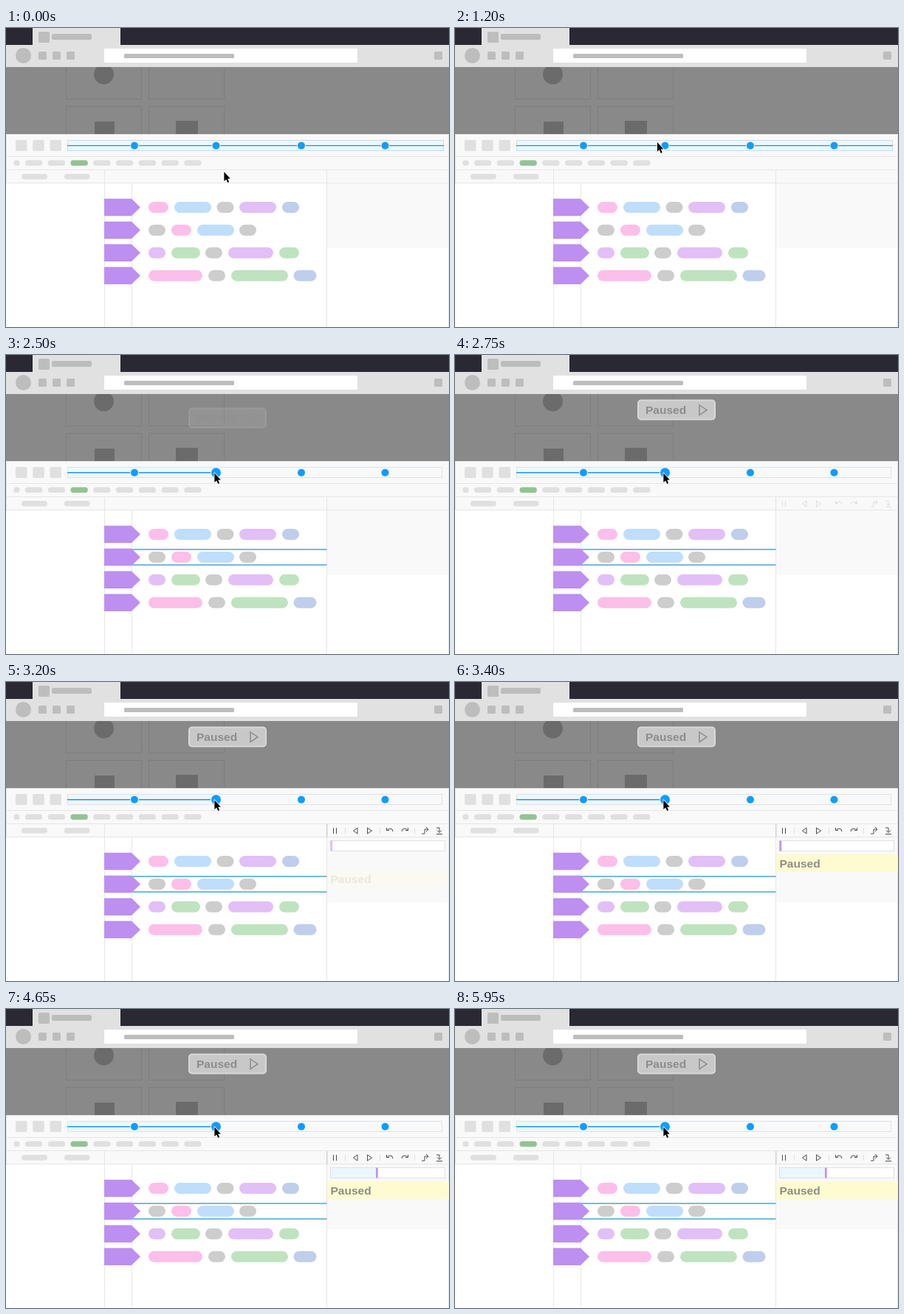
Animation, 600 px wide and 406 px high, one loop 6000 ms. Source, as an HTML page with a canvas:

```html
<!DOCTYPE html>
<html lang="en">
<head>
<meta charset="utf-8">
<title>Animation inspector</title>
<style>
html, body { margin: 0; width: 100%; height: 100%; overflow: hidden; background: #fff; }
canvas { display: block; width: 600px; height: 406px; }
</style>
</head>
<body>
<canvas id="stage"></canvas>
<script>
const W = 600, H = 406, LOOP = 6000;
const canvas = document.getElementById('stage');
const ctx = canvas.getContext('2d');
const dpr = window.devicePixelRatio || 1;
canvas.width = W * dpr;
canvas.height = H * dpr;

const PINK = '#fbbfea', BLUE = '#bfdefb', GREY = '#cdcdcd', LILAC = '#e2bff6',
      GREEN = '#bfe3bf', SLATE = '#bfceec', PURPLE = '#bd8ff0', CHIP = '#e0e0e0',
      LINE = '#e6e6e6', ACCENT = '#0f9dff', ICON = '#bdbdbd', MUTED = '#8c8c8c';

// Pills of each row: [x, width, colour]
const rows = [
  { y: 243.5, pills: [[193, 27, PINK], [228, 50, BLUE], [285.5, 23, GREY], [316, 50, LILAC], [374, 23, SLATE]] },
  { y: 274.5, pills: [[193, 23, GREY], [224, 27, PINK], [259, 50, BLUE], [316, 23, GREY]] },
  { y: 305.3, pills: [[193, 23, LILAC], [224, 39, GREEN], [270, 23, GREY], [301, 61, LILAC], [370, 27, GREEN]] },
  { y: 336.2, pills: [[193, 73, PINK], [274, 23, GREY], [305, 77, GREEN], [389.5, 31, SLATE]] }
];
const dots = [174, 284.5, 400, 513.5];

const mix = (a, b, p) => a + (b - a) * p;

// Cubic ease-in-out progress between two times
function ease(t, from, to) {
  const p = Math.min(1, Math.max(0, (t - from) / (to - from)));
  return p < 0.5 ? 4 * p ** 3 : 1 - 4 * (1 - p) ** 3;
}

function rect(x, y, w, h, fill) {
  ctx.fillStyle = fill;
  ctx.fillRect(x, y, w, h);
}

function round(x, y, w, h, r, fill) {
  ctx.beginPath();
  ctx.roundRect(x, y, w, h, r);
  ctx.fillStyle = fill;
  ctx.fill();
}

function frame(x, y, w, h, stroke) {
  ctx.strokeStyle = stroke;
  ctx.lineWidth = 1;
  ctx.strokeRect(x + 0.5, y + 0.5, w - 1, h - 1);
}

function disc(x, y, r, fill) {
  ctx.beginPath();
  ctx.arc(x, y, r, 0, Math.PI * 2);
  ctx.fillStyle = fill;
  ctx.fill();
}

function path(points, close) {
  ctx.beginPath();
  points.forEach(([x, y]) => ctx.lineTo(x, y));
  if (close) ctx.closePath();
}

function strokePath(points, close) {
  path(points, close);
  ctx.stroke();
}

function faded(alpha, draw) {
  if (alpha <= 0) return;
  ctx.save();
  ctx.globalAlpha = alpha;
  draw();
  ctx.restore();
}

function label(x, y, color) {
  ctx.font = 'bold 15.5px "Liberation Sans", Arial, sans-serif';
  ctx.fillStyle = color;
  ctx.fillText('Paused', x, y);
}

function drawPage() {
  rect(0, 53, W, 91, '#898989');
  ctx.save();
  ctx.beginPath();
  ctx.rect(0, 53, W, 91);
  ctx.clip();
  for (const x of [81, 193]) {
    frame(x, 20, 103, 77, '#7d7d7d');
    frame(x, 106, 103, 77, '#7d7d7d');
  }
  disc(132.5, 63, 13.5, '#6b6b6b');
  rect(120, 127, 27, 27, '#6b6b6b');
  rect(230, 126, 30, 30, '#6b6b6b');
  ctx.restore();
}

function drawBrowser() {
  rect(0, 0, W, 23, '#2a2833');
  rect(36, 0, 119, 23, '#e1e1e1');
  rect(0, 23, W, 30, '#e1e1e1');
  round(44, 5, 15, 15, 1.5, ICON);
  round(62, 8, 54, 8, 2, ICON);
  disc(23.5, 37.5, 10.5, ICON);
  for (const x of [44, 63, 82, 580]) round(x, 32, 11, 11, 1.5, ICON);
  round(133, 28, 343, 19, 1, '#fff');
  round(160, 35, 149, 6, 1.5, ICON);
}

function drawPanel() {
  rect(0, 144, W, 262, '#fff');
  rect(0, 144, W, 67, '#f9f9fa');
  rect(435, 211, 165, 88, '#f9f9f9');
  for (const y of [144, 174, 192, 210]) rect(0, y, W, 1, LINE);
  rect(0, 144, 1, 67, LINE);
  rect(599, 144, 1, 262, LINE);
  rect(133, 193, 1, 213, LINE);
  rect(170, 211, 1, 195, LINE);
  rect(434, 193, 1, 213, LINE);
  for (const x of [13, 36.3, 59.5]) round(x, 152, 15.5, 15, 2, CHIP);
  round(10.5, 179.5, 8, 7.5, 3, CHIP);
  for (let i = 0; i < 8; i++) {
    round(26 + i * 30.75, 179.5, 23.3, 7.5, 3.5, i === 2 ? '#94c294' : CHIP);
  }
  round(21, 198, 35, 7.5, 3.5, CHIP);
  round(79, 198, 34.5, 7.5, 3.5, CHIP);
}

function drawTimeline(t) {
  const cut = ease(t, 1750, 2050);
  const grow = ease(t, 1400, 1700);
  rect(83, 152, 509.5, 15, '#edf7fe');
  frame(83, 152, 510, 15, '#c9dce8');
  rect(83, 159, 510, 1.3, '#2196e3');
  faded(cut, () => {
    rect(285, 152, 308, 15, '#f9f9fa');
    frame(83, 152, 508, 15, '#dfe3e6');
    rect(83, 159, 202, 1.3, '#2196e3');
  });
  dots.forEach((x, i) => {
    const r = i === 1 ? mix(5, 6.5, grow) : 5;
    disc(x, 159.8, r + 1, '#edf7fe');
    disc(x, 159.8, r, ACCENT);
  });
}

function drawRows(t) {
  faded(ease(t, 1400, 1700), () => {
    rect(171, 263.3, 263.5, 1.5, '#48a5d3');
    rect(171, 284.3, 263.5, 1.5, '#48a5d3');
  });
  for (const { y, pills } of rows) {
    path([[133, y - 11.7], [170, y - 11.7], [182, y], [170, y + 11.7], [133, y + 11.7]], true);
    ctx.fillStyle = PURPLE;
    ctx.fill();
    for (const [x, w, fill] of pills) round(x, y - 7.5, w, 15, 7.5, fill);
  }
}

function drawBadge(t) {
  const p = ease(t, 2400, 2700);
  faded(p, () => {
    ctx.translate(0, mix(13, 0, p));
    ctx.beginPath();
    ctx.roundRect(248, 61.5, 104, 26, 4);
    ctx.fillStyle = '#c8c8c8';
    ctx.fill();
    ctx.strokeStyle = '#d8d8d8';
    ctx.lineWidth = 2;
    ctx.stroke();
    label(258, 80.3, MUTED);
    ctx.strokeStyle = MUTED;
    ctx.lineWidth = 1.5;
    strokePath([[331, 68], [341, 74.7], [331, 81.5]], true);
  });
}

// Curved arrow; dir -1 points left, 1 points right
function drawTurn(x, dir) {
  ctx.save();
  ctx.translate(x, 202);
  ctx.scale(dir, 1);
  ctx.beginPath();
  ctx.arc(0, 1, 4, Math.PI, -0.3);
  ctx.stroke();
  strokePath([[4.5, -4], [4.5, -0.5], [1, -0.5]]);
  ctx.restore();
}

function drawControls(t) {
  faded(ease(t, 2650, 2950), () => {
    rect(434, 193, 1.5, 18, '#d2d2d2');
    ctx.strokeStyle = '#4c4c4c';
    ctx.lineWidth = 1;
    strokePath([[443.5, 198], [443.5, 206]]);
    strokePath([[447.5, 198], [447.5, 206]]);
    strokePath([[476, 198], [470.5, 202], [476, 206]], true);
    strokePath([[489.5, 198], [495.5, 202], [489.5, 206]], true);
    drawTurn(520, -1);
    drawTurn(540, 1);
    strokePath([[563, 206], [567, 206], [567, 200], [572, 200]]);
    strokePath([[569, 197], [572, 200], [569, 203]]);
    strokePath([[583, 198], [587, 198], [587, 204]]);
    strokePath([[584, 201.5], [587, 204.5], [590, 201.5]]);
    strokePath([[583, 206.5], [591, 206.5]]);
    for (const x of [459, 506, 553]) rect(x, 198, 1, 8, '#dedede');
  });
}

function drawScrubber(t) {
  const x = mix(439.5, 501, ease(t, 3650, 4150));
  faded(ease(t, 2950, 3150), () => {
    rect(439, 215, 156, 15, '#fff');
    rect(439, 215, x - 439, 15, '#ebf7fe');
    frame(439, 215, 156, 15, '#e0e0e0');
  });
  faded(ease(t, 3050, 3350), () => rect(x, 215.5, 2.7, 14, '#c690ec'));
}

function drawNotice(t) {
  const p = ease(t, 3100, 3400);
  faded(p, () => {
    ctx.translate(0, mix(25, 0, p));
    rect(435, 234, 165, 24, '#fffbd0');
    label(439.5, 251.7, MUTED);
  });
}

function drawCursor(t) {
  const near = ease(t, 500, 800), on = ease(t, 1100, 1400);
  ctx.save();
  ctx.translate(mix(mix(295, 272, near), 282, on), mix(mix(195, 154, near), 160, on));
  path([[0.4, 0.2], [0.4, 13], [3.2, 10.4], [5.2, 15], [7.2, 14.1], [5.2, 9.7], [8.8, 9.5]], true);
  ctx.lineJoin = 'round';
  ctx.strokeStyle = '#fff';
  ctx.lineWidth = 1.6;
  ctx.stroke();
  ctx.fillStyle = '#000';
  ctx.fill();
  ctx.restore();
}

function draw(t) {
  ctx.setTransform(dpr, 0, 0, dpr, 0, 0);
  drawPage();
  drawBrowser();
  drawBadge(t);
  drawPanel();
  drawTimeline(t);
  drawRows(t);
  drawControls(t);
  drawScrubber(t);
  drawNotice(t);
  drawCursor(t);
}

const start = performance.now();
function tick() {
  draw((performance.now() - start) % LOOP);
  requestAnimationFrame(tick);
}
tick();
</script>
</body>
</html>
```
